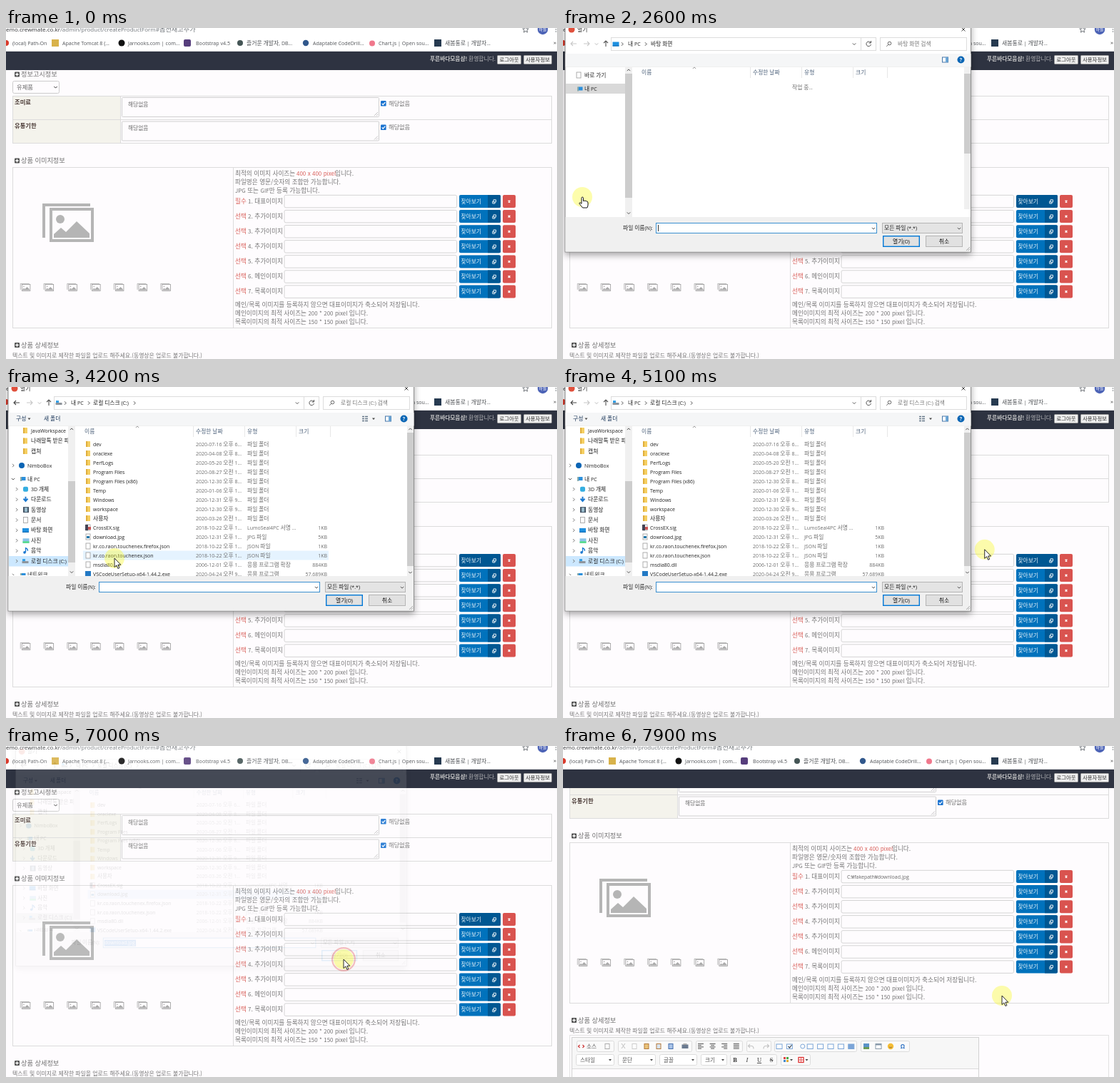
An HTML page that plays this animation: 772 px wide and 464 px high, repeating every 8000 ms.

```html
<!DOCTYPE html>
<html lang="ko">
<head>
<meta charset="utf-8">
<title>상품 이미지 등록</title>
<style>
html,body{margin:0;width:100%;height:100%;overflow:hidden;background:#fff}
#stage{display:block;width:772px;height:464px}
text{font-family:"Noto Sans CJK KR","Noto Sans CJK",sans-serif;white-space:pre}
.u{font-family:"Open Sans","Noto Sans CJK KR","Noto Sans CJK",sans-serif}
.b{font-weight:700}
.m{text-anchor:middle}
.e{text-anchor:end}
#frame{filter:drop-shadow(0 4px 5px rgba(0,0,0,.35))}
</style>
</head>
<body>
<svg id="stage" viewBox="0 0 772 464" xmlns="http://www.w3.org/2000/svg"></svg>
<script>
const stage = document.getElementById('stage');
const paper = '#fefcfe', ink = '#757575', red = '#d9605a';

// Text is placed by the middle of its line
const T = (x, y, s, z = 8.6, c = ink, k = '') =>
  `<text x="${x}" y="${y + z * .36}" font-size="${z}" fill="${c}" class="${k}">${s}</text>`;
const resize = (s, runs, z) => s.replace(runs, m => `<tspan font-size="${z}">${m}</tspan>`);
// Interface text has larger Hangul, page text has smaller Latin
const U = (x, y, s, c = '#222', z = 7, k = '') => T(x, y, resize(s, /[가-힣]+/g, z * 1.11), z, c, 'u ' + k);
const N = (x, y, s, c = ink, z = 8.65) => T(x, y, resize(s, /[\w*]+/g, z * .92), z, c);
const R = (x, y, w, h, f, a = '') => `<rect x="${x}" y="${y}" width="${w}" height="${h}" fill="${f}" ${a}/>`;
const box = (x, y, w, h, f, s, r = 0) => R(x + .5, y + .5, w - 1, h - 1, f, `stroke="${s}" rx="${r}"`);
const P = (d, s, w = 1, f = 'none') => `<path d="${d}" stroke="${s}" stroke-width="${w}" fill="${f}"/>`;
const C = (x, y, r, f, a = '') => `<circle cx="${x}" cy="${y}" r="${r}" fill="${f}" ${a}/>`;
const G = (id, s) => `<g id="${id}">${s}</g>`;
const clip = (x, y, w, h, s) =>
  `<svg x="${x}" y="${y}" width="${w}" height="${h}" viewBox="${x} ${y} ${w} ${h}">${s}</svg>`;
const down = (x, y, c = '#555') => P(`M${x - 2.2} ${y - 1.1}l2.2 2.2 2.2-2.2`, c);
const up = (x, y, c = '#555') => P(`M${x - 2.2} ${y + 1.1}l2.2-2.2 2.2 2.2`, c);
const right = (x, y, c = '#777') => P(`M${x - 1} ${y - 2.2}l2.2 2.2-2.2 2.2`, c);
const drop = (x, y, c = '#444') => P(`M${x - 2} ${y - 1}h4l-2 2.4z`, 'none', 0, c);

function browser() {
  const host = '#303134', path = '#70757a';
  let s = R(0, 0, 772, 33, '#fff');
  s += T(0, 2, `emo.crewmate.co.kr<tspan fill="${path}">/admin/product/createProductForm#<tspan font-size="9.2">옵션재고추가</tspan></tspan>`, 8, host, 'u');
  s += P('M728-2l1.2 2.8 3 .3-2.3 2 .7 3-2.6-1.6-2.6 1.6.7-3-2.3-2 3-.3z', path);
  s += C(752, 2, 7.2, '#4c63b6') + T(752, 2, '하늘', 6, '#fff', 'm');
  s += C(770.5, -1, .8, path) + C(770.5, 2, .8, path) + C(770.5, 5, .8, path);
  s += C(0, 21, 4, '#d93a2b') + R(64, 16, 10, 10, '#d8b24a') + C(162, 21, 4.5, '#111') + R(249, 16, 10, 10, '#563d7c', 'rx="2"');
  s += C(328, 21, 4, '#455') + C(420, 21, 4.2, '#31588c') + C(513, 21.5, 4, '#f0788c') + R(600, 16, 10, 10, '#263a50');
  const marks = [[9, '(local) Path-On'], [79, 'Apache Tomcat 8 (...'], [171, 'Jarnooks.com | com...'], [266, 'Bootstrap v4.5'],
    [337, '즐거운 개발자, DB...'], [430, 'Adaptable CodeDrill...'], [522, 'Chart.js | Open sou...'], [615, '새봄통로 | 개발자...']];
  s += marks.map(([x, n]) => U(x, 21, n, '#505357', 7.1)).join('');
  s += U(767, 20, '»', '#444', 8) + R(0, 32, 772, 1, '#dfe0e3') + R(0, 33, 772, 26, '#2e3341');
  s += T(594, 43.5, '푸른바다모음샵!', 7.7, '#ccc', 'b') + T(648, 43.5, '환영합니다.', 7.8, '#b5b5b8');
  s += box(688, 38, 34, 13, '#efefef', '#999', 1) + T(705, 44.3, '로그아웃', 7.3, '#333', 'm');
  s += box(725, 38, 40, 13, '#efefef', '#999', 1) + T(745, 44.3, '사용자정보', 7.4, '#333', 'm');
  return s;
}

const head = (y, s) => R(12, y - 3.5, 7, 7, '#555', 'rx="1"') + P(`M13.2 ${y}h4.6M15.5 ${y - 2.3}v4.6`, '#fff', 1.3) + T(21, y, s, 9.2, '#707070');

// A framed landscape in front of a second frame
const hill = 'M67 294v-5l10-9 7 6 15-15 18 17v6z';
const picture = P('M51 246h67v4H55v44h-4z', 'none', 0, '#b5b5b5') + R(63, 254, 58, 44, paper, 'stroke="#b5b5b5" stroke-width="4"') +
  C(76, 268, 6, '#b5b5b5') + P(hill, 'none', 0, '#b5b5b5');
const thumb = P('M53 290v-42h62', '#aaa', 4) + R(63, 254, 58, 44, paper, 'stroke="#999" stroke-width="4"') + C(76, 268, 4, '#aaa') + P(hill, 'none', 0, '#aaa');

function notice(y, name, label) {
  let s = T(12, y + 9, name, 8.3, '#4a3a36', 'b') + box(162, y + 2, 361, 28, paper, '#d0d0d0', 1);
  s += T(171, y + 12, label, 7.7, '#6a6a6a') + P(`M516 ${y + 28}l5-5M519 ${y + 28}l2-2`, '#aaa', .7);
  return s + R(525, y + 7, 7.6, 7.6, '#1a73d0', 'rx="1.2"') + P(`M526.6 ${y + 10.8}l1.7 1.7 3-3.4`, '#fff', 1.2) + T(536, y + 11, label, 8.2);
}

function upload(name, i) {
  const y = 243 + i * 21.1, first = i === 0;
  let s = T(321, y - .5, first ? '필수' : '선택', 8.6, red) + N(339, y - .5, `${i + 1}. ${name}`);
  s += R(390, y - 8.7, 241.5, 17.5, paper, 'stroke="#d4d4d4" rx="2"');
  if (first) s += G('chosen', U(398, y, 'C:₩fakepath₩download.jpg', '#666'));
  s += R(635, y - 9, 58, 18, '#0072bc', `rx="2" ${first ? 'id="browse"' : ''}`) + P(`M675 ${y - 9}h16q2 0 2 2v14q0 2-2 2h-16z`, 'none', 0, '#005792');
  s += T(637.5, y, '찾아보기', 7.7, '#eef5fa');
  s += P(`M683 ${y - 2.2}h3.4v3.2h-3.4zM683 ${y}h-1.2v3h3.200v-1.800`, '#fff', .9);
  return s + R(696, y - 9, 18, 18, '#d9534f', 'rx="2"') + P(`M703.6 ${y - 1.3}l2.8 2.8m0-2.8l-2.8 2.8`, '#fff', 1.3);
}

function editor() {
  const bar = (x, w, y) => box(x, y - 8, w, 16, '#fafafa', '#dcdcdc', 2);
  const y = 481, y2 = 500, blue = '#7ba5d8';
  let s = box(9, 465, 756, 200, paper, '#e2e2e2') + box(12, 468, 571, 190, paper, '#d2d2d2') + R(13, 469, 569, 43, '#f7f7f7') + R(13, 512, 569, 1, '#dcdcdc');
  s += [[19, 53], [77, 104], [186, 66], [257, 35], [296, 116], [417, 69]].map(([x, w]) => bar(x, w, y)).join('');
  const leaf = (x, c, f = '#fff') => R(x - 3, y - 3.5, 6, 7, f, `stroke="${c}"`);
  s += P(`M23.5 ${y - 2}l-2 2 2 2m4-4l2 2-2 2`, '#c33', 1.2) + T(33, y, '소스', 7.6, '#555') + leaf(62, '#aaa');
  s += P(`M82 ${y - 4}l5 7m0-7l-5 7`, '#bbb') + leaf(100, '#ccc') + leaf(117, '#b57b3a', '#e8c27a') + leaf(134, '#b57b3a', '#d8e4f2') + leaf(151, '#456fae', '#a9c4e8');
  s += R(166.5, y - 2.5, 9, 5.5, '#6b7b90') + R(168.5, y - 4, 5, 2, '#aaa');
  for (let i = 0; i < 4; i++) for (let k = 0; k < 4; k++) {
    const w = k % 2 && i < 3 ? 5 : 8, x = 189 + i * 16.6 + (i === 1 ? (8 - w) / 2 : i === 2 ? 8 - w : 0);
    s += R(x, y - 4 + k * 2.2, w, 1, '#555');
  }
  s += P(`M262 ${y - 3}l-2.5 2.5 2.5 2.5M260 ${y - .5}h4q3 0 3 4M286 ${y - 3}l2.5 2.5-2.5 2.5M288 ${y - .5}h-4q-3 0-3 4`, '#c4c4c4', 1.2);
  for (let i = 0; i < 8; i++) {
    const x = 303 + i * 14.4;
    s += i === 2 ? C(x + 4, y, 3, '#fff', `stroke="${blue}"`) : R(x - 4, y - 3, 8, 6.5, i === 7 ? blue : '#fff', `stroke="${blue}"`);
  }
  s += P(`M315.5 ${y}l2 2 3-4`, '#345', 1.2) + R(421, y - 4, 8, 8, '#5b93c8') + R(421, y + 1, 8, 3, '#6a9b55') + R(438, y - 3.5, 8, 7, '#fff', 'stroke="#89a"') + R(438, y - 3.5, 8, 2, '#89a');
  s += C(459, y, 4.2, '#f4bd36') + P(`M457 ${y + 1}q2 2 4 0`, '#754', .8) + U(476, y, 'Ω', '#2f72c4', 8, 'm b');
  [[18, 54, '스타일'], [77, 53, '문단'], [135, 53, '글꼴'], [193, 37, '크기']].forEach(([x, w, n]) => {
    s += box(x, y2 - 8, w, 16, '#fff', '#dcdcdc', 2) + T(x + 6, y2, n, 7.6, '#555') + drop(x + w - 6, y2);
  });
  const styles = { B: 'font-weight:700', I: 'font-style:italic', U: 'text-decoration:underline', S: 'text-decoration:line-through' };
  s += bar(234, 66, y2) + Object.keys(styles).map((n, i) =>
    `<text x="${241 + i * 17}" y="${y2 + 3}" class="m" font-size="8.5" fill="#333" style="font-family:Liberation Serif,serif;${styles[n]}">${n}</text>`).join('');
  s += bar(305, 42, y2) + ['#d44', '#4a4', '#48c', '#da3'].map((c, i) => R(309 + i % 2 * 4, y2 - 4 + (i >> 1) * 4, 3, 3, c)).join('');
  s += drop(320, y2) + R(330, y2 - 3.5, 7, 7, '#fff', 'stroke="#d33" stroke-width="1.3"') + P(`M330 ${y2}h7m-3.5-3v6`, '#d33', .8) + drop(341.5, y2);
  return s;
}

function page() {
  const line = '#dcdcdc', names = ['대표', '추가', '추가', '추가', '추가', '메인', '목록'];
  let s = head(65, '정보고시정보') + box(9, 74, 66, 18, paper, '#ccc', 2) + T(15, 83, '유제품', 8.3, '#666') + down(69.5, 83, '#333');
  s += box(9, 95, 756, 67, paper, line) + R(10, 96, 150, 65, '#f4f3ec') + R(160, 95, 1, 66, line) + R(9, 128, 756, 1, line);
  s += notice(95, '조미료', '해당없음') + notice(128.5, '유통기한', '해당없음');
  s += head(186, '상품 이미지정보') + box(9, 195, 756, 226, paper, line) + R(318, 195, 1, 225, line) + picture;
  for (let i = 0; i < 7; i++) s += `<g transform="translate(${9.7 + i * 32.75} 308.8) scale(.2)">${thumb}</g>`;
  s += N(321, 204, '최적의 이미지 사이즈는') + N(407, 204, '400 x 400 pixel', red) + N(461, 204, '입니다.');
  s += N(321, 216, '파일명은 영문/숫자의 조합만 가능합니다.') + N(321, 228, 'JPG 또는 GIF만 등록 가능합니다.');
  s += names.map((n, i) => upload(n + '이미지', i)).join('');
  s += N(321, 387.5, '메인/목록 이미지를 등록하지 않으면 대표이미지가 축소되어 저장됩니다.');
  s += N(321, 399.7, '메인이미지의 최적 사이즈는 200 * 200 pixel 입니다.') + N(321, 411.8, '목록이미지의 최적 사이즈는 150 * 150 pixel 입니다.');
  s += head(444.5, '상품 상세정보') + T(9, 459, '텍스트 및 이미지로 제작한 파일을 업로드 해주세요.(동영상은 업로드 불가합니다.)', 7.87);
  return s + editor();
}

const folder = (x, y) => R(x - 3, y - 4, 6, 8, '#f5cf62', 'rx=".5"') + R(x - 3, y - 4, 2, 8, '#e0ae3c');
const screen = (x, y) => R(x - 4.5, y - 3, 9, 6, '#1e90e0') + R(x - 4.5, y + 2, 9, 1, '#0b65ad');
const pc = (x, y) => R(x - 2.5, y - 3, 6, 5, '#2b8fdc') + R(x - 4, y - 3, 2, 6, '#8aa');
const disk = (x, y) => R(x - 4.5, y, 9, 3, '#8d949b') + R(x - 4, y - 3, 4, 3, '#35a0e6');
const sheet = (x, y, c = '#999') => R(x - 3, y - 4, 6, 8, '#fff', `stroke="${c}" stroke-width=".8"`);

function navEarly() {
  return R(87, 54, 10, 211, '#f0f0f0') + R(87, 64, 10, 174, '#cdcdcd') + R(4, 78, 83, 14, '#d9d9d9') +
    sheet(22, 66) + U(30, 66, '바로 가기') + pc(24, 85.5) + U(30, 85.5, '내 PC');
}

function navTree() {
  let s = R(4, 237, 83, 14.5, '#cce8ff', 'id="navSel"');
  ['JavaWorkspace', '나래말톡 받은 파일', '캡쳐'].forEach((n, i) => s += folder(27, 61 + i * 14.5) + U(35, 61 + i * 14.5, n));
  s += right(10, 110) + C(22, 110, 4, '#0a64b4') + U(30, 110, 'NimboBox') + down(10, 129) + pc(24, 129) + U(30, 129, '내 PC');
  const items = {
    '3D 개체': y => R(24, y - 3.5, 7, 7, '#35aee0', 'rx="2"'),
    '다운로드': y => P(`M27.5 ${y - 4}v6m-3-3l3 3.3 3-3.3`, '#1a78d0', 2),
    '동영상': y => R(24, y - 4, 8, 8, '#456') + R(26, y - 3, 4, 6, '#9bc'),
    '문서': y => sheet(27.5, y),
    '바탕 화면': y => screen(27.5, y),
    '사진': y => R(23.5, y - 3, 9, 6.5, '#8bc3e8') + R(23.5, y + 1, 9, 2.5, '#5d8'),
    '음악': y => P(`M27.5 ${y + 2}v-6q3 1 3 4`, '#1a78d0', 1.3) + C(26, y + 2.2, 1.8, '#1a78d0'),
    '로컬 디스크 (C:)': y => disk(27, y)
  };
  Object.entries(items).forEach(([n, icon], i) => {
    const y = 143.3 + i * 14.4;
    s += right(15, y) + icon(y) + U(35, y, n);
  });
  s += right(10, 264) + pc(24, 264) + U(30, 263.5, '네트워크');
  return R(87, 54, 10, 211, '#f0f0f0') + R(87, 132, 10, 114, '#cdcdcd') + clip(4, 55, 83, 209, s);
}

const files = `dev|2020-07-16 오후 6
oraclexe|2020-04-08 오후 8
PerfLogs|2020-05-20 오전 1
Program Files|2020-08-27 오전 1
Program Files (x86)|2020-12-30 오후 8
Temp|2020-01-06 오후 1
Windows|2020-12-31 오후 9
workspace|2020-12-30 오후 9
사용자|2020-03-26 오전 1
CrossEX.sig|2018-10-22 오후 1|LumoSeal4PC 서명 ...|1KB
download.jpg|2020-12-31 오후 1|JPG 파일|5KB
kr.co.raon.touchenex.firefox.json|2018-10-22 오후 1|JSON 파일|1KB
kr.co.raon.touchenex.json|2018-10-22 오후 1|JSON 파일|1KB
msdia80.dll|2006-12-01 오후 1|응용 프로그램 확장|884KB
VSCodeUserSetup-x64-1.44.2.exe|2020-04-24 오전 9|응용 프로그램|57,689KB`.split('\n').map(l => l.split('|'));

function list() {
  const gray = '#6d6d6d';
  let s = R(108, 0, 344, 13, '#e5f3ff', 'id="hover"') + R(108, 203.5, 344, 13, '#cce8ff', 'id="picked"');
  files.forEach(([name, date, type, size], i) => {
    const y = 80 + 13 * i;
    s += i < 9 ? folder(115, y) : i === 14 ? R(111, y - 4, 8, 8, '#2279c4') : sheet(115, y);
    if (i === 9) s += R(111, y - 4, 4, 8, '#445') + R(115, y - 1, 4, 4, '#c55');
    if (i === 10) s += R(113, y - 1, 4, 3, '#27a');
    s += U(122, y, name) + U(266, y, date + '...', gray) + U(338, y, type || '파일 폴더', gray) + U(450, y, size || '', gray, 7, 'e');
  });
  return clip(98, 70, 464, 195, s) + R(562, 54, 9, 211, '#f0f0f0') + R(562, 64, 9, 187, '#cdcdcd') + up(566.5, 59) + down(566.5, 260);
}

function dialog() {
  const dim = '#c8c8c8', navy = '#1e395b', edge = '#dcdcdc';
  let s = R(3, -12, 568.5, 326, '#fff', 'id="frame" stroke="#777" stroke-width=".8"');
  s += C(12, 2, 4.5, '#e0503c') + U(20, 2, '열기') + P('M558.5-.5l5 5m0-5l-5 5', '#333', .9);
  s += `<g id="back" stroke="${dim}">${P('M19 22h-8m3-3l-3 3 3 3', 'inherit', 1.1)}</g>`;
  s += P('M29 22h8m-3-3l3 3-3 3', dim, 1.1) + down(47, 22.5, '#bbb') + P('M60 26v-8m-3 3l3-3 3 3', '#555', 1.1);
  s += box(67, 13, 372, 19, '#fff', edge) + R(417, 13, 1, 19, edge) + down(408, 22.5) + P('M431 20.5a3.3 3.3 0 1 0 .5 2.5M431.5 18v3h-3', '#555') + box(444, 13, 122, 19, '#fff', edge);
  s += C(457.5, 21.5, 2.3, 'none', 'stroke="#666"') + P('M455.8 23.3l-2.5 2.5', '#666') + right(83, 22.5, '#444') + U(91, 22.5, '내 PC') + right(116, 22.5, '#444');
  s += G('atDesk', screen(74, 22.5) + U(123, 22.5, '바탕 화면') + U(469, 22.5, '바탕 화면 검색', '#767676'));
  s += G('atDisk', disk(74, 22) + U(122, 22.5, '로컬 디스크 (C:)') + right(180, 22.5, '#444') + U(469, 22.5, '로컬 디스크 (C:) 검색', '#767676'));
  s += R(3.5, 36, 568, 18, '#f5f6f7') + R(3.5, 54, 568, .6, '#e4e4e4');
  s += G('tools', U(14, 44.5, '구성', navy) + drop(32.5, 44.5) + U(53, 44.5, '새 폴더', navy) + P('M499 41.5h3m1 0h4m-8 3h3m1 0h4m-8 3h3m1 0h4', '#678', 1.3) + drop(515, 44.5));
  s += R(531.5, 41, 8, 7, '#fff', 'stroke="#47a"') + R(536, 41, 3.5, 7, '#6ba6d6') + C(557.5, 44.5, 5, '#0b66b5') + U(557.5, 44.5, '?', '#fff', 7, 'm b');
  s += G('navEarly', navEarly()) + G('navTree', navTree()) + up(92, 59) + down(92, 259.5) + up(184, 56, '#999');
  [[110, '이름'], [266, '수정한 날짜'], [338, '유형'], [410, '크기']].forEach(([x, n]) => s += U(x, 62, n, '#4c607a'));
  s += [262, 334, 406, 454].map(x => R(x, 55, .8, 15, '#e2e2e2')).join('');
  s += G('busy', U(321, 83.5, '작업 중...', '#6d6d6d') + R(562, 54, 9, 200, '#f0f0f0') + R(562, 64, 9, 112, '#cdcdcd')) + G('list', list());
  s += R(3.5, 265, 567.5, 48.5, '#f0f0f0') + U(84, 280, '파일 이름(N):') + box(130, 273, 310, 15, '#fff', '#3a8fcf') + down(435, 281);
  s += R(132, 276, 46, 9.5, '#2a7fd6', 'id="mark"') + G('fileName', U(132.5, 280.5, 'download.jpg')) + R(133, 276, .8, 9, '#000', 'id="caret"');
  s += box(447, 273, 113, 15, '#e4e4e4', '#b5b5b5') + U(450, 280.5, '모든 파일 (*.*)') + down(555, 281);
  s += R(448.7, 291.7, 50.6, 14.6, '#e1e1e1', 'id="open" stroke="#0078d7" stroke-width="1.4"') + U(474, 299, '열기(O)', '#111', 7, 'm');
  s += box(508, 291, 52, 16, '#e1e1e1', '#b5b5b5') + U(534, 299, '취소', '#111', 7, 'm');
  return s + P('M565 312l5-5m-2.5 5l2.5-2.5', '#aaa');
}

const arrow = 'M0 0V12.5L2.9 9.9 4.9 14.5 6.9 13.6 4.9 9.2H8.8Z';
const hand = 'M-1 1.5Q-1 0 .2 0T1.5 1.5V5.5Q4 4.7 5.5 5.6 8 5.8 8 8V11Q8 13 6.8 15H.5Q-1.5 12.5-4 9.3-4.5 7.6-2.7 8L-1 9.3Z';

stage.innerHTML = R(0, 0, 772, 464, paper) + clip(0, 59, 772, 405, G('page', page())) + browser() + G('dialog', dialog()) +
  G('cursor', C(0, 0, 14, '#fbfa30', 'opacity=".4"') + C(0, 0, 0, 'none', 'id="ring" stroke-width="2.2"') +
    G('arrow', P(arrow, '#111', .9, '#fff')) + G('hand', P(hand, '#111', 1, '#fff')));

const el = {};
stage.querySelectorAll('[id]').forEach(e => el[e.id] = e);
const set = (id, k, v) => el[id].setAttribute(k, v);
const show = (id, on) => el[id].style.display = on ? '' : 'none';

// Pointer stops: time, x, y
const route = [[300, 38, 285], [700, 330, 169], [1100, 647, 243], [1600, 647, 243], [2000, 34, 238], [2200, 27, 237], [3000, 27, 237], [3400, 50, 252], [3600, 45, 244],
  [4000, 45, 244], [4200, 152, 240], [4500, 152, 240], [4600, 150, 234], [4700, 150, 250], [4800, 150, 250], [5250, 745, 220], [5700, 147, 212], [5900, 147, 212],
  [6200, 300, 150], [6500, 473, 299], [7000, 473, 299], [7500, 618, 343], [7700, 615, 350], [8000, 615, 350]];
const clicks = [1245, 3570, 5740, 6730];
const ease = p => p * p * (3 - 2 * p);
const span = (t, a, b) => Math.min(1, Math.max(0, (t - a) / (b - a)));

function pointer(t) {
  const i = Math.max(1, route.findIndex(k => k[0] > t));
  const [a, x, y] = route[i - 1], [b, u, v] = route[i], p = ease(span(t, a, b));
  return [x + (u - x) * p, y + (v - y) * p];
}

function update(ms) {
  const t = Math.floor(ms % 8000 / 100) * 100; // ten pictures a second
  const [x, y] = pointer(t);
  show('cursor', t >= 300);
  set('cursor', 'transform', `translate(${x} ${y})`);
  const pointing = t >= 2100 && t < 2900;
  show('hand', pointing);
  show('arrow', !pointing);
  const hit = clicks.find(c => t >= c && t < c + 310), p = hit ? (t - hit) / 310 : 0;
  show('ring', hit);
  set('ring', 'r', 5 + 12.5 * p);
  set('ring', 'stroke', `rgba(226,50,50,${1 - .8 * p})`);

  const fade = t < 2500 ? .5 : t < 6900 ? 1 : t < 7000 ? .55 : .11;
  const k = t < 2500 ? .97 : t < 6900 ? 1 : t < 7000 ? .985 : .963;
  show('dialog', t >= 2400 && t < 7100);
  set('dialog', 'opacity', fade);
  set('dialog', 'transform', `translate(287 157.5) scale(${k}) translate(-287 -157.5)`);

  const tree = t >= 2900, onDisk = t >= 3700, loaded = t >= 4000, chosen = t >= 5800, marked = t >= 6800;
  show('navEarly', !tree);
  show('navTree', tree);
  show('tools', tree);
  show('navSel', onDisk);
  set('navSel', 'fill', chosen ? '#d9d9d9' : '#cce8ff');
  show('atDesk', !onDisk);
  show('atDisk', onDisk);
  set('back', 'stroke', onDisk ? '#444' : '#c8c8c8');
  show('busy', !loaded);
  show('list', loaded);
  show('picked', chosen);
  show('fileName', chosen);
  show('caret', t < 3100);
  show('mark', marked);
  el.fileName.firstChild.setAttribute('fill', marked ? '#fff' : '#222');
  show('hover', x > 108 && x < 452 && y > 73 && y < 265);
  set('hover', 'y', 73.5 + 13 * Math.round((y - 80) / 13));
  set('open', 'fill', x > 448 && x < 500 && y > 291 ? '#e5f1fb' : '#e1e1e1');

  set('browse', 'fill', t >= 1900 && t < 7200 ? '#005792' : '#0072bc');
  show('chosen', t >= 7200);
  set('page', 'transform', `translate(0 ${-60 * ease(span(t, 7500, 7800))})`);
}

function loop() {
  update(performance.now());
  requestAnimationFrame(loop);
}
loop();
</script>
</body>
</html>
```
